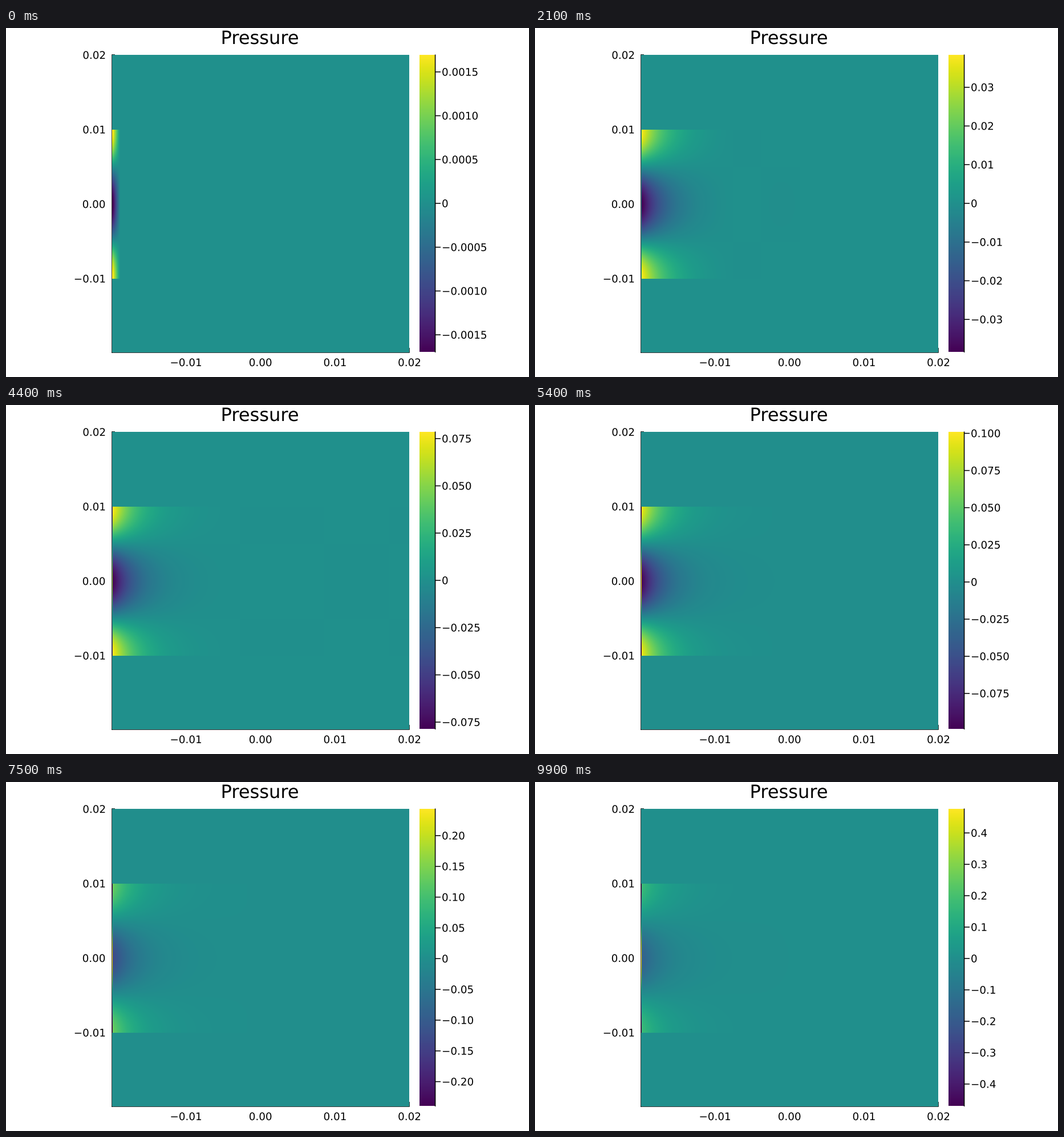
Animation of 917 by 611 pixels, one loop 10000 ms. Source, as a matplotlib script:

```python
import numpy as np
import matplotlib.pyplot as plt
from matplotlib.animation import FuncAnimation
from matplotlib.patches import PathPatch
from matplotlib.textpath import TextPath
from matplotlib.transforms import Affine2D

W, H, DPI = 917, 611, 64
FRAMES, INTERVAL = 100, 100

LEFT, TOP, SIZE = 186, 47, 521       # heatmap square
RIGHT, BOTTOM = LEFT + SIZE, TOP + SIZE
MID_X, MID_Y = 446.2, 308.3          # where both axes read zero
UNIT = 130.5                         # pixels per 0.01
BAR_X, BAR_TOP, BAR_BOTTOM = (725, 752.5), 47, 567
LINE, TEXT, TITLE = 1.53, 18.34, 32.1
SPEED = 12.6                         # wave front, pixels per frame
SUB = 12                             # solver steps per frame
RAMP, DRIFT = 0.001747, 6.515e-5     # linear bulk growth, quadratic wall growth

plt.rcParams["font.family"] = "DejaVu Sans"


def solve_profiles():
    """Evanescent duct mode driven by a linear ramp at the left wall."""
    n = FRAMES * SUB + 20
    dx = SPEED / SUB
    mass = (np.pi / UNIT * dx) ** 2
    x = np.arange(n) * dx
    cols = np.maximum(np.arange(SIZE) - 1.3, 0)
    old, now = np.zeros(n), np.zeros(n)
    out = []
    for step in range(1, FRAMES * SUB + 1):
        new = np.zeros(n)
        new[1:-1] = (now[2:] + now[:-2]) * (1 - mass / 2) - old[1:-1]
        new[0] = step / SUB
        old, now = now, new
        if step % SUB == 0:
            out.append(np.interp(cols, x, now))
    return out


profiles = solve_profiles()
y = np.arange(SIZE) + 0.5 + TOP - MID_Y
inside = np.abs(y) <= UNIT
mode = np.where(inside, np.cos(np.pi * y / UNIT), 0)
wall = np.where(inside, 0.9945 * mode + 0.0055, 0)

# The mode weakens and loses its sharp sides past the duct mouth.
far = np.clip((np.arange(SIZE) - 200) / 80, 0, 1)
far = far * far * (3 - 2 * far)
shape = mode[:, None] * (1 - 0.7 * far) * np.exp(-far * (y[:, None] / 90) ** 2)


def limits(m):
    bulk = RAMP * (m - 0.03)
    hi = max(bulk, DRIFT * m * m - RAMP * m)
    lo = -max(bulk, 0.989 * DRIFT * m * m - RAMP * m)
    return lo, hi


def pressure(m):
    p = -RAMP * (1 - 0.03 / m) * profiles[m - 1] * shape
    p[:, 0] = DRIFT * m * m * wall - RAMP * m * mode
    return p


def tick_step(hi):
    """Step of the colour bar ticks and its number of decimals."""
    e = int(np.floor(np.log10(hi)))
    f = hi / 10.0 ** e
    if f < 1.25:
        return 0.25 * 10.0 ** e, 2 - e
    if f < 2.5:
        return 0.5 * 10.0 ** e, 1 - e
    if f < 5:
        return 10.0 ** e, -e
    return 2.5 * 10.0 ** e, 1 - e


fig = plt.figure(figsize=(W / DPI, H / DPI), dpi=DPI, facecolor="white")
ax = fig.add_axes([0, 0, 1, 1])
ax.axis("off")


def line(x0, y0, x1, y1, z=1):
    return ax.plot([x0, x1], [y0, y1], color="black", lw=LINE * 72 / DPI,
                   solid_capstyle="butt", snap=False, zorder=z)[0]


def text_path(x, y, s, ha="left", size=TEXT):
    """Outline of s with its baseline at y; left keeps the pen origin at x."""
    path = TextPath((0, 0), s, size=size)
    box = path.get_extents()
    shift = {"left": 0, "center": (box.x0 + box.x1) / 2, "right": box.x1}[ha]
    return path.transformed(Affine2D().translate(-shift, 0).scale(1, -1).translate(x, y))


def label(*args):
    return ax.add_patch(PathPatch(text_path(*args), fc="black", lw=0, zorder=4))


def number(v, digits):
    return f"{v:.{digits}f}".replace("-", "\u2212")


heat = ax.imshow(np.zeros((SIZE, SIZE)), cmap="viridis", interpolation="nearest",
                 extent=(LEFT, RIGHT, BOTTOM, TOP), aspect="auto", zorder=2)
ax.imshow(np.linspace(1, 0, 256)[:, None], cmap="viridis", interpolation="nearest",
          extent=(*BAR_X, BAR_BOTTOM, BAR_TOP), aspect="auto", zorder=2)
ax.set_xlim(0, W)
ax.set_ylim(H, 0)

label(445.8, 28, "Pressure", "center", TITLE)
for k in (-1, 0, 1, 2):
    s = number(k / 100, 2)
    label(173.3, MID_Y - k * UNIT + 6.7, s, "right")
    label(MID_X + k * UNIT, 592, s, "center")

# The heatmap hides the inner half of the axes and their end ticks.
line(LEFT, TOP - 0.7, LEFT, BOTTOM + 0.7)
line(LEFT - 0.7, BOTTOM, RIGHT + 0.7, BOTTOM)
line(LEFT, TOP, LEFT + 5, TOP)
line(RIGHT, BOTTOM - 8, RIGHT, BOTTOM)
line(752.6, 46.5, 752.6, 568, 3)

marks = [(line(752, 0, 762, 0, 3), label(764, 0, "0")) for _ in range(11)]


def draw(i):
    m = i + 1
    lo, hi = limits(m)
    heat.set_data(pressure(m))
    heat.set_clim(lo, hi)

    step, digits = tick_step(hi)
    ticks = np.arange(np.ceil(lo / step), np.floor(hi / step) + 1) * step
    for k, (tick, text) in enumerate(marks):
        shown = k < len(ticks)
        tick.set_visible(shown)
        text.set_visible(shown)
        if shown:
            v = ticks[k]
            pos = BAR_BOTTOM + (v - lo) / (hi - lo) * (BAR_TOP - BAR_BOTTOM)
            tick.set_ydata([pos, pos])
            s = number(v, digits) if abs(v) > step / 2 else "0"
            text.set_path(text_path(764, pos + 6.7, s))
    return [heat]


anim = FuncAnimation(fig, draw, frames=FRAMES, interval=INTERVAL,
                     repeat=True, repeat_delay=0, blit=False)
plt.show()
```
